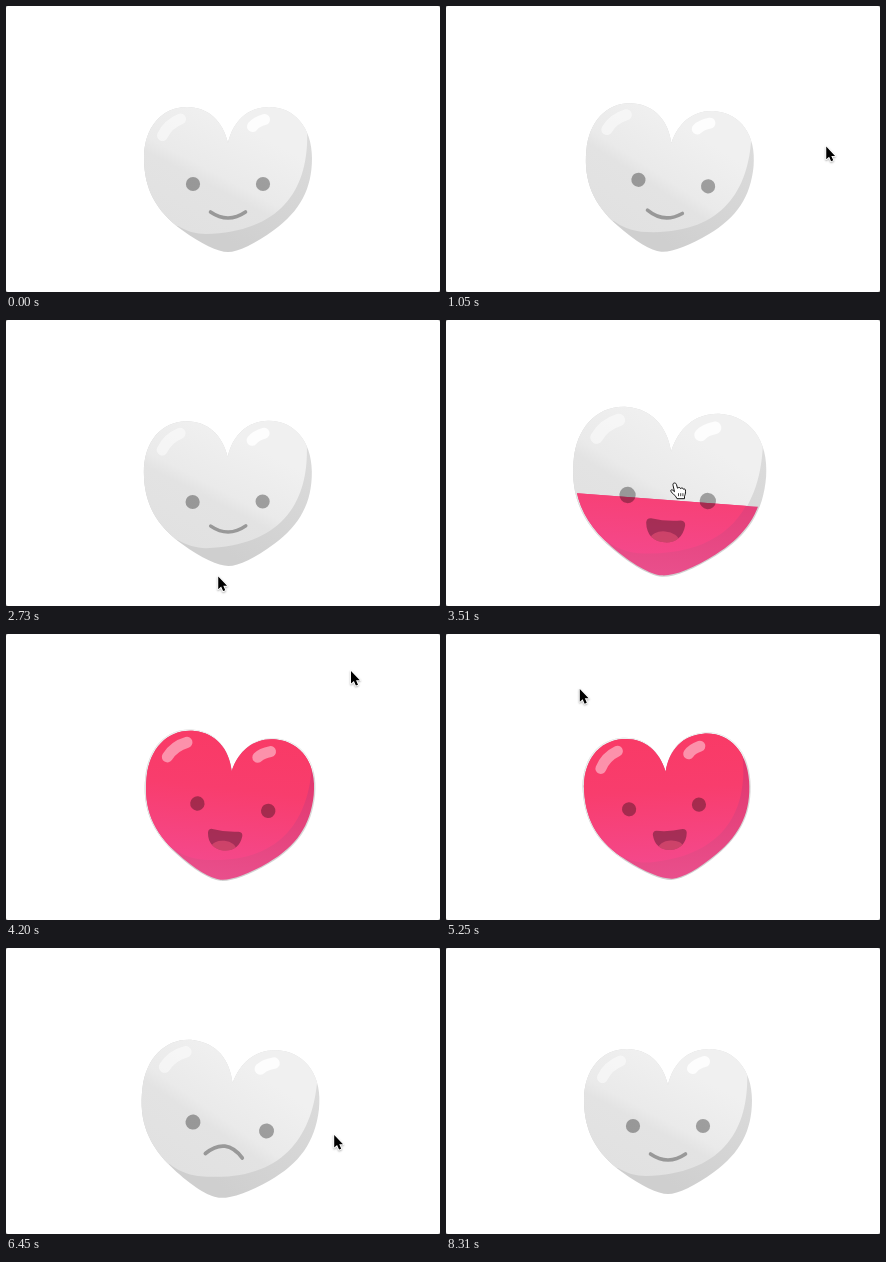
Animation of 434 by 286 pixels, one loop 8.37 s. Source, as an HTML page with a canvas:

```html
<!DOCTYPE html>
<html lang="en">
<head>
<meta charset="utf-8">
<title>Heart button</title>
<style>
html, body { margin: 0; width: 100%; height: 100%; overflow: hidden; background: #888; }
canvas { display: block; background: #fff; border-radius: 2px; }
</style>
</head>
<body>
<canvas id="stage" width="434" height="286"></canvas>
<script>
const ctx = document.getElementById('stage').getContext('2d');
const LOOP = 8370, CX = 222, CY = 173;
const LIKE = 3230, UNLIKE = 5780;

const heart = new Path2D('M222 137C217 115 202 101 181 101C156 101 138 121 138 152C138 183 150 205 176 224C195 238 212 246 222 246C232 246 249 238 268 224C294 205 306 183 306 152C306 121 288 101 263 101C242 101 227 115 222 137Z');
const lit = new Path2D('M130 90H301V122C304 180 278 226 200 228C190 228 180 225 172 220L130 220Z');
const shineLeft = new Path2D('M156.5 129.5Q162 118 174.5 113');
const shineRight = new Path2D('M246.5 120.5Q250 116 258.5 113.5');
const openMouth = new Path2D('M209 196Q222 198 235 196Q239 196 239 200C238 211 231 216 222 216C213 216 206 211 205 200Q205 196 209 196Z');
const arrow = new Path2D('M0 0V14L3.2 11.2L5.4 16.2L7.8 15.2L5.6 10.3H9.8Z');
const hand = new Path2D('M0 .8C1 .8 1.6 1.3 2 2.5L3 6C4 5 5.8 5 6 6.4C7 5.4 8.6 5.7 8.8 7C10 6.2 11.2 7 11 9C11 12 10.5 12.5 10 14V16.5H2.5C1.5 14-1 12-3.5 9.5C-4.5 8-3 7-1.5 8.2L0 9.5L-1.5 3C-1.8 1.5-1 .8 0 .8Z');
const knuckles = new Path2D('M4 11V14M6.2 11V14M8.4 11V14');

// Turning points of the pointer: time, x, y
const route = [
  [570, 440, 148], [1350, 312, 137], [1710, 172, 152], [2240, 54, 190],
  [2760, 225, 257], [2950, 346, 216], [3280, 230, 163], [3800, 229, 163],
  [4200, 345, 37], [4740, 245, 22], [5250, 134, 55], [5400, 106, 86],
  [5850, 212, 158], [6450, 328, 187], [7000, 442, 192]
];

const clamp = (v, lo, hi) => Math.min(hi, Math.max(lo, v));

function ramp(t, from, to) {
  const u = clamp((t - from) / (to - from), 0, 1);
  return u * u * (3 - 2 * u);
}

// Speed at a turning point: zero where the direction reverses
function slope(j, axis) {
  if (j === 0 || j === route.length - 1) return 0;
  const rate = i => (route[i + 1][axis] - route[i][axis]) / (route[i + 1][0] - route[i][0]);
  const a = rate(j - 1), b = rate(j);
  return a * b <= 0 ? 0 : 2 * a * b / (a + b);
}

function cursorAt(time) {
  const t = clamp(time, route[0][0], route[route.length - 1][0]);
  const i = Math.max(1, route.findIndex(p => p[0] >= t)) - 1;
  const a = route[i], b = route[i + 1], span = b[0] - a[0];
  const u = (t - a[0]) / span, w = 1 - u;
  return [1, 2].map(n => a[n] * w * w * (1 + 2 * u) + b[n] * u * u * (3 - 2 * u)
    + span * u * w * (slope(i, n) * w - slope(i + 1, n) * u));
}

function isOver(t) {
  const [x, y] = cursorAt(t);
  return ctx.isPointInPath(heart, CX + (x - CX) / 1.12, CY + (y - CY) / 1.12);
}

// Hover eases in and out as the mean over the last moments
function hoverAt(t) {
  let sum = 0;
  for (let k = 0; k < 24; k++) sum += isOver(t - k * 10);
  return sum / 24;
}

const pulse = (t, at) => ramp(t, at, at + 180) - ramp(t, at + 320, at + 600);

function gradient(x0, y0, x1, y1, ...stops) {
  const g = ctx.createLinearGradient(x0, y0, x1, y1);
  stops.forEach(([at, color]) => g.addColorStop(at, color));
  return g;
}

const grey = gradient(176, 224, 232, 118, [0, '#e1e1e1'], [.44, '#e3e3e3'], [.55, '#eaeaea'], [1, '#f0f0f0']);
const greyShade = gradient(230, 240, 306, 140, [0, '#cfcfcf'], [1, '#dbdbdb']);
const pink = gradient(0, 101, 0, 235, [0, '#f93a66'], [.4, '#f83d6d'], [1, '#f4498d']);
const pinkShade = gradient(0, 120, 0, 246, [0, '#e0346a'], [1, '#e94f8c']);

function zoom(s) {
  ctx.translate(CX, CY);
  ctx.scale(s, s);
  ctx.translate(-CX, -CY);
}

function body(shade, light, leftAlpha, rightAlpha) {
  ctx.save();
  ctx.fillStyle = shade;
  ctx.fill(heart);
  ctx.clip(heart);
  ctx.fillStyle = light;
  ctx.fill(lit);
  ctx.lineCap = 'round';
  ctx.lineWidth = 11;
  ctx.strokeStyle = `rgba(255,255,255,${leftAlpha})`;
  ctx.stroke(shineLeft);
  ctx.strokeStyle = `rgba(255,255,255,${rightAlpha})`;
  ctx.stroke(shineRight);
  ctx.restore();
}

function face(eyeX, eyeY, open, bend) {
  ctx.fillStyle = ctx.strokeStyle = 'rgba(0,0,0,.33)';
  for (const x of [187, 257]) {
    ctx.beginPath();
    ctx.arc(x + eyeX, 178 + eyeY, 7.1, 0, 7);
    ctx.fill();
  }
  if (open < 1) {
    ctx.globalAlpha = 1 - open;
    ctx.lineWidth = 3.6;
    ctx.lineCap = 'round';
    ctx.beginPath();
    ctx.moveTo(204.5, 206);
    ctx.quadraticCurveTo(222, bend, 239.5, 206);
    ctx.stroke();
    ctx.globalAlpha = 1;
  }
  if (open > 0) {
    ctx.save();
    ctx.translate(0, 206);
    ctx.scale(1, open);
    ctx.translate(0, -206);
    ctx.fill(openMouth);
    ctx.clip(openMouth);
    ctx.fillStyle = 'rgba(232,80,118,.6)';
    ctx.beginPath();
    ctx.ellipse(222, 214, 12.5, 7.5, 0, 0, 7);
    ctx.fill();
    ctx.restore();
  }
}

function pointer(x, y, over) {
  ctx.save();
  ctx.translate(x, y);
  ctx.lineJoin = 'round';
  if (over) {
    ctx.translate(-.8, -.8);
    ctx.fillStyle = '#fff';
    ctx.strokeStyle = '#111';
    ctx.lineWidth = 1;
    ctx.fill(hand);
    ctx.stroke(hand);
    ctx.lineWidth = .8;
    ctx.stroke(knuckles);
  } else {
    ctx.scale(.9, .9);
    ctx.shadowColor = 'rgba(0,0,0,.3)';
    ctx.shadowBlur = 2;
    ctx.shadowOffsetY = 1;
    ctx.strokeStyle = '#fff';
    ctx.lineWidth = 2;
    ctx.stroke(arrow);
    ctx.shadowColor = 'transparent';
    ctx.fillStyle = '#000';
    ctx.fill(arrow);
  }
  ctx.restore();
}

function draw(t) {
  const [x, y] = cursorAt(t);
  const hover = hoverAt(t);
  const notice = ramp(t, 570, 1000) - ramp(t, 6500, 7200);
  const dx = clamp(x - CX, -125, 125) * notice, dy = (y - CY) * notice;
  const tilt = .043 * dx + 4 * hover;
  const scale = 1 + .1 * hover + .05 * (pulse(t, LIKE) + pulse(t, UNLIKE));
  const gaze = .045 * (1 - .9 * hover);
  const level = ramp(t, LIKE + 20, LIKE + 570) - ramp(t, UNLIKE, UNLIKE + 400);
  const open = ramp(t, LIKE, LIKE + 160) - ramp(t, UNLIKE, UNLIKE + 150);
  const bend = t < UNLIKE ? 218 : 188 + 30 * ramp(t, 7710, 8310);

  ctx.clearRect(0, 0, 434, 286);
  ctx.save();
  ctx.translate(CX, CY);
  ctx.rotate(tilt * Math.PI / 180);
  ctx.translate(-CX, -CY);
  zoom(scale);
  body(greyShade, grey, .5, .9);
  if (level > 0) {
    ctx.save();
    ctx.beginPath();
    ctx.rect(120, 247 - 147 * level, 204, 160);
    ctx.clip();
    zoom(.984);
    body(pinkShade, pink, .44, .44);
    ctx.restore();
  }
  face(gaze * dx, gaze * dy - .6 * hover, open, bend);
  ctx.restore();
  pointer(x, y, isOver(t));
}

const start = performance.now();
function frame() {
  draw((performance.now() - start) % LOOP);
  requestAnimationFrame(frame);
}
frame();
</script>
</body>
</html>
```
